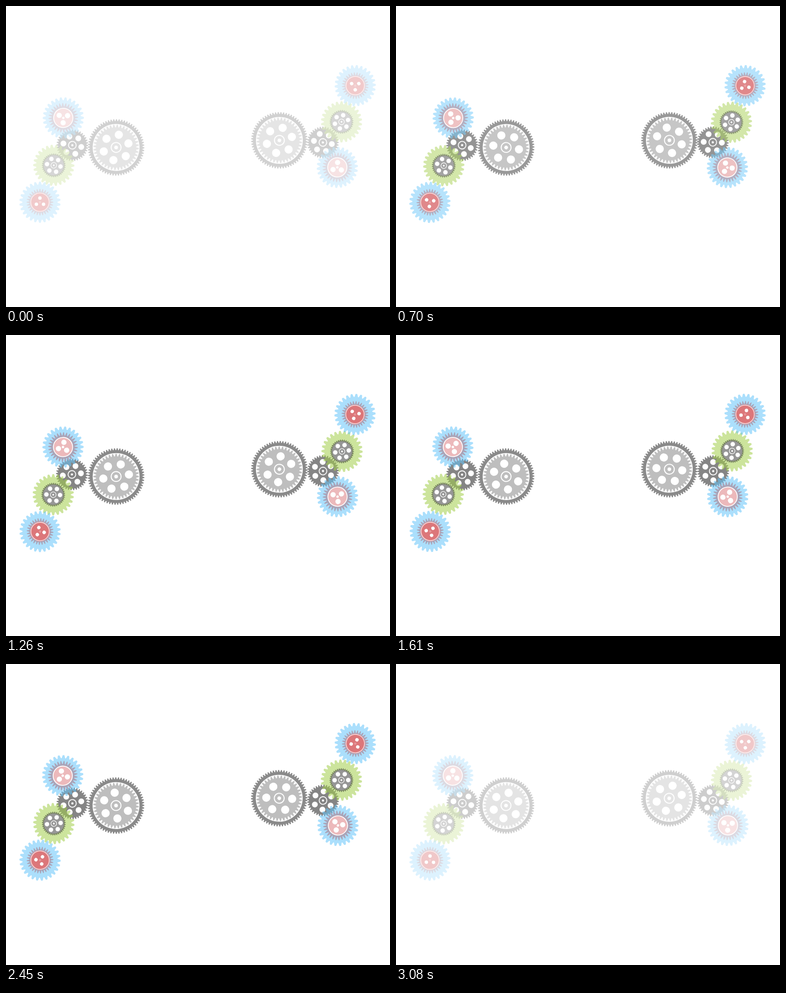
An HTML page with a canvas that plays this animation: 845x662 px, repeating every 3.15 s.

```html
<!DOCTYPE html>
<html lang="en">
<head>
<meta charset="utf-8">
<title>Turning gears</title>
<style>
html, body { margin: 0; width: 100%; height: 100%; overflow: hidden; background: #fff; }
canvas { display: block; width: 845px; height: 662px; }
</style>
</head>
<body>
<canvas id="stage"></canvas>
<script>
const W = 845, H = 662, LOOP = 3150, STEP = 70;
const canvas = document.getElementById('stage');
const ctx = canvas.getContext('2d');
const dpr = window.devicePixelRatio || 1;
canvas.width = W * dpr;
canvas.height = H * dpr;

const clamp = (v, lo = 0, hi = 1) => Math.min(hi, Math.max(lo, v));

// Toothed outline; "flat" squares the teeth, "fat" widens them.
function cog(teeth, tip, root, flat, fat = 0.5) {
  const path = new Path2D();
  const count = teeth * 20;
  for (let i = 0; i < count; i++) {
    const a = i / count * 2 * Math.PI;
    const r = root + (tip - root) * clamp(fat + flat * Math.cos(a * teeth));
    path.lineTo(r * Math.sin(a), -r * Math.cos(a));
  }
  path.closePath();
  return path;
}

function disc(r, color, x = 0, y = 0) {
  ctx.fillStyle = color;
  ctx.beginPath();
  ctx.arc(x, y, r, 0, 2 * Math.PI);
  ctx.fill();
}

function ring(r, width, color = '#fff') {
  ctx.strokeStyle = color;
  ctx.lineWidth = width;
  ctx.beginPath();
  ctx.arc(0, 0, r, 0, 2 * Math.PI);
  ctx.stroke();
}

function holes(count, dist, r) {
  for (let i = 0; i < count; i++) {
    const a = i / count * 2 * Math.PI;
    disc(r, '#fff', dist * Math.sin(a), -dist * Math.cos(a));
  }
}

function fill(path, color) {
  ctx.fillStyle = color;
  ctx.fill(path);
}

const shape = {
  bigRim: cog(64, 62.2, 58, 0.75, 0.6),
  bigCore: cog(40, 50.3, 44, 0.6, 0.55),
  dark: cog(36, 35, 31, 0.7, 0.55),
  wide: cog(26, 45.3, 38.5, 0.7, 0.65),
  hub: cog(36, 26.4, 23.5, 0.6),
  pinkStar: cog(28, 32.8, 25.5, 0.55),
  redStar: cog(28, 29.6, 23, 0.55)
};
const BLUE = 'rgba(102,197,250,.55)';
const GREEN = 'rgba(162,206,75,.55)';
const MAUVE = '#aaa4b8';

const draw = {
  big() {
    fill(shape.bigRim, '#8a8a8a');
    disc(51.6, '#fff');
    fill(shape.bigCore, '#bebebe');
    holes(6, 28.5, 9);
    ring(10.9, 2.1);
    disc(4, '#fff');
  },
  dark() {
    fill(shape.dark, '#858585');
    holes(6, 20, 6.4);
    ring(8.4, 1.9);
    disc(2.4, '#fff');
  },
  green() {
    fill(shape.wide, GREEN);
    fill(shape.hub, '#77835f');
    disc(22.3, '#969696');
    holes(6, 15, 4.9);
    ring(6.2, 1.3);
    disc(2, '#fff');
  },
  pink() {
    fill(shape.wide, BLUE);
    fill(shape.pinkStar, MAUVE);
    disc(21, '#ecb9bb');
    ring(21.2, 1.8);
    holes(3, 10.6, 5.8);
    disc(2.7, '#fff');
  },
  red() {
    fill(shape.wide, BLUE);
    fill(shape.redStar, MAUVE);
    disc(22, '#c8929f');
    disc(20, '#dc777a');
    ring(20.2, 1.8, '#f6d3d4');
    holes(3, 9.1, 3.8);
    disc(2.5, '#e59597');
  }
};

// kind, pivot x, pivot y, start angle, total turn, offset of the gear from its pivot
const gears = [
  ['big', 242.2, 311.2, 12, 180, 0.1, -0.1],
  ['big', 601.4, 295.4, 14.5, -180, 0.2, 0.1],
  ['dark', 145.6, 306.6, -19, -360, 0.4, -0.4],
  ['dark', 697.6, 299.7, -20, 360, -0.3, 0.4],
  ['green', 104.5, 350.8, -20, 450, 0.6, -0.4],
  ['green', 738.9, 255.4, 14, -450, -0.6, -0.6],
  ['pink', 125.5, 245.8, 62, 180, 0.6, 0.3],
  ['pink', 729.8, 354.9, 3, -180, -0.7, 0],
  ['red', 75, 431.8, 0, -360, -0.3, -0.3],
  ['red', 768.3, 174.9, 60, 360, 0.2, 0.3]
];

function turnAt(t) {
  return (1 - Math.cos(Math.PI * clamp((t + 110) / 3210))) / 2;
}

function opacityAt(t) {
  const rise = 0.385 + 0.615 * clamp(t / 890);
  const fall = 1 - 0.6 * clamp((t - 2800) / 280);
  return Math.min(rise, fall);
}

function render(time) {
  const t = Math.floor(time % LOOP / STEP) * STEP;
  const turn = turnAt(t) - turnAt(0);
  ctx.setTransform(dpr, 0, 0, dpr, 0, 0);
  ctx.clearRect(0, 0, W, H);
  for (const [kind, x, y, start, total, dx, dy] of gears) {
    ctx.save();
    ctx.translate(x, y);
    ctx.rotate(total * turn * Math.PI / 180);
    ctx.translate(dx, dy);
    ctx.rotate(start * Math.PI / 180);
    draw[kind]();
    ctx.restore();
  }
  canvas.style.opacity = opacityAt(t);
}

const begin = performance.now();
function tick() {
  render(performance.now() - begin);
  requestAnimationFrame(tick);
}
tick();
</script>
</body>
</html>
```
